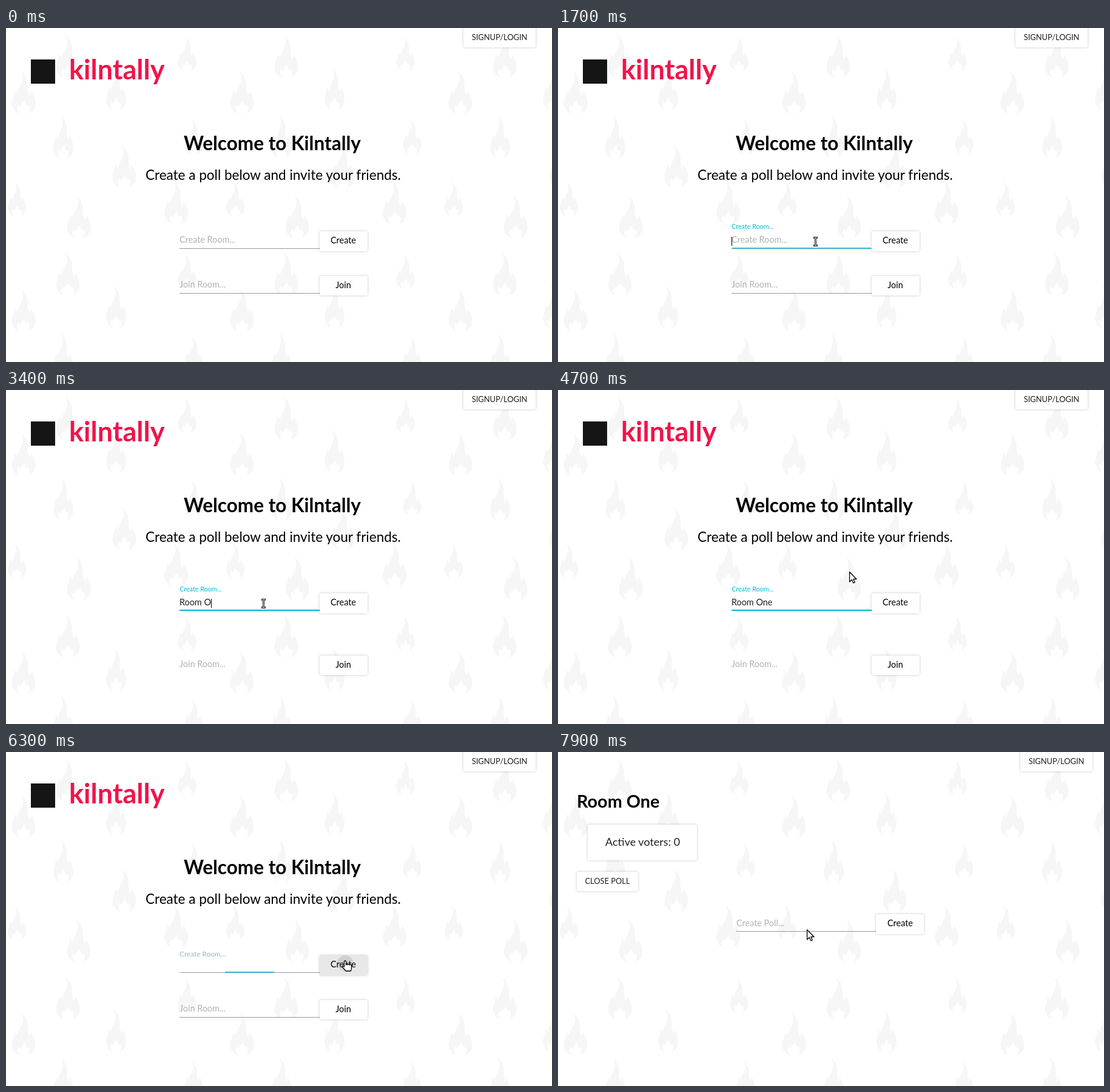
Recreate the animation shown at these times as an HTML page. Size 900x552 px, loop 8000 ms.

```html
<!DOCTYPE html>
<html lang="en">
<head>
<meta charset="utf-8">
<title>Kilntally</title>
<style>
html, body { margin: 0; width: 100%; height: 100%; overflow: hidden; background: #fff; }
svg { display: block; width: 900px; height: 552px; font-family: Lato, sans-serif; }

/* type */
.brand { font-size: 45px; font-weight: 700; fill: #f0144a; }
.h1 { font-size: 31.5px; font-weight: 700; }
.h2 { font-size: 22.5px; }
.room-name { font-size: 28.8px; font-weight: 700; }
.voters { font-size: 18px; fill: #212121; }
.caps { font-size: 12.9px; fill: #212121; text-anchor: middle; }
.btn { font-size: 14.4px; text-anchor: middle; }
.field { font-size: 14.4px; }
.hint { fill: rgba(0, 0, 0, .3); }
.value { fill: #212121; }
.label { font-size: 10.8px; fill: #00bcd4; }

/* surfaces */
.paper { fill: #fff; filter: drop-shadow(0 .9px 2.7px rgba(0, 0, 0, .12)) drop-shadow(0 .9px 1.8px rgba(0, 0, 0, .12)); }
.rule { fill: #999; }
.focus { fill: #00b4cc; }
.focus, .ripple { transform-box: fill-box; transform-origin: center; }
.cursor path { stroke-linejoin: round; }

/* 8 s loop, 1.25% = 100 ms */
.home, .room, .signup, .hint1, .label, .focus, .join, .join-rule, .typing, .mask, .caret,
.hover, .ripple, .cursor, .arrow, .beam, .hand { animation: 8s step-end infinite; }

.home { animation-name: home; }
@keyframes home { 0% { opacity: 1 } 80%, 100% { opacity: 0 } }
.room { animation-name: room; }
@keyframes room { 0% { opacity: 0 } 80%, 100% { opacity: 1 } }
.signup { animation-name: signup; }
@keyframes signup { 0% { transform: none } 80%, 100% { transform: translateX(8px) } }

.hint1 { animation-name: hint; }
@keyframes hint { 0% { opacity: 1 } 28.75%, 100% { opacity: 0 } }
.label { transform-origin: 286px 333px; animation-name: label; }
@keyframes label {
  0% { opacity: 0; transform: translateY(-.6px) }
  21.25% { opacity: 1; transform: translateY(-.6px) }
  22.5% { opacity: 1; transform: none; fill: #00bcd4 }
  78.75%, 100% { opacity: 1; transform: translateY(4.6px) scale(1.1); fill: #8bbccb }
}
.focus { animation-name: focus; }
@keyframes focus {
  0% { transform: scaleX(0) }
  21.25% { transform: scaleX(.99); fill: #35b2c8 }
  22.5% { transform: none; fill: #00b4cc }
  78.75%, 100% { transform: scaleX(.35); fill: #35b2c8 }
}
.join { animation-name: join; }
@keyframes join { 0%, 78.75%, 100% { transform: none } 28.75% { transform: translateY(29px) } }
.join-rule { animation-name: join-rule; }
@keyframes join-rule { 0%, 78.75%, 100% { opacity: 1 } 28.75% { opacity: 0 } }

/* --w is the width of the text typed so far */
.typing, .mask { --w: 0px; animation-name: typing; }
@keyframes typing {
  0% { --w: 0px }
  28.75% { --w: 9px }
  31.25% { --w: 17.3px }
  33.75% { --w: 25.5px }
  37.5% { --w: 37.5px }
  40% { --w: 40.5px }
  42.5% { --w: 52px }
  45% { --w: 60px }
  46.25% { --w: 67.5px }
  78.75%, 100% { --w: 0px }
}
.mask { width: calc(var(--w) + .4px); }
.typed { clip-path: url(#typed); }
.caret-at { transform: translateX(var(--w)); }
.caret { animation-name: caret; }
@keyframes caret {
  0%, 26.25%, 53.75%, 68.75%, 78.75%, 100% { opacity: 0 }
  21.25%, 28.75%, 61.25%, 76.25% { opacity: 1 }
}

.hover { animation-name: hover; }
@keyframes hover { 0%, 80%, 100% { opacity: 0 } 76.25% { opacity: .05 } 77.5% { opacity: .09 } }
.ripple { animation-name: ripple; }
@keyframes ripple {
  0%, 80%, 100% { opacity: 0; transform: scale(.5) }
  77.5% { opacity: .1; transform: scale(.5) }
  78.75% { opacity: .1; transform: none }
}

.cursor { animation-name: move; }
@keyframes move {
  0% { opacity: 0; transform: translate(473.5px, 432px) }
  6.25% { opacity: 1; transform: translate(473.5px, 432px) }
  7.5% { transform: translate(445px, 384px) }
  16.25% { transform: translate(424.5px, 353px) }
  56.25% { transform: translate(439.5px, 340px) }
  57.5% { transform: translate(459px, 314px) }
  58.75% { transform: translate(480px, 300px) }
  60% { transform: translate(498px, 296px) }
  61.25% { transform: translate(515px, 301px) }
  62.5% { transform: translate(530px, 312px) }
  63.75% { transform: translate(543px, 326px) }
  65% { transform: translate(552px, 337px) }
  66.25% { transform: translate(556px, 341px) }
  67.5% { transform: translate(558px, 343px) }
  68.75% { transform: translate(559px, 344px) }
  70% { transform: translate(559px, 345px) }
  80% { transform: translate(558px, 347px) }
  90% { transform: translate(539px, 346px) }
  91.25% { transform: translate(513px, 338px) }
  92.5% { transform: translate(485px, 329px) }
  93.75% { transform: translate(459px, 319px) }
  95% { transform: translate(438px, 309px) }
  96.25% { transform: translate(423px, 301px) }
  97.5% { transform: translate(414px, 296px) }
  98.75%, 100% { opacity: 1; transform: translate(410px, 293px) }
}
.arrow { animation-name: arrow; }
@keyframes arrow { 0%, 16.25%, 65% { opacity: 0 } 7.5%, 57.5%, 80%, 100% { opacity: 1 } }
.beam { animation-name: beam; }
@keyframes beam { 0%, 16.25% { opacity: 1 } 7.5%, 57.5%, 100% { opacity: 0 } }
.hand { animation-name: hand; }
@keyframes hand { 0%, 80%, 100% { opacity: 0 } 65% { opacity: 1 } }
</style>
</head>
<body>
<svg viewBox="0 0 900 552" xmlns="http://www.w3.org/2000/svg">
  <defs>
    <path id="flame" d="M-5 0C5 7 8 18 7 28C7 34 8 37 10 40C12 38 12 36 12 33C17 40 20 47 19.5 55C19 63 14 69 7 71C11 66 11 61 8 57C6 60 3 58 2 50C-3 53-4 56-5 60C-7 59-8 58-8 56C-12 61-11 67-6 71C-14 69-19.5 62-19.5 54C-19.5 46-15 41-15 33C-13 34-12 36-11 38C-8 28-1 21-1 12C-1 7-3 3-5 0Z"/>
    <pattern id="fire" width="360" height="360" patternUnits="userSpaceOnUse">
      <g fill="#f6f6f6">
        <use href="#flame" transform="translate(102 11)"/>
        <use href="#flame" transform="translate(29 70.5)"/>
        <use href="#flame" transform="translate(195 193)"/>
        <use href="#flame" transform="translate(280.5 253)"/>
        <use href="#flame" transform="translate(120 276)"/>
        <use href="#flame" transform="translate(181.5 65) scale(.84 1)"/>
        <use href="#flame" transform="translate(94.5 144.5) scale(.84 1)"/>
        <use href="#flame" transform="translate(298.5 14) scale(.78 .8)"/>
        <use href="#flame" transform="translate(309.5 151) scale(.78 .8)"/>
        <use href="#flame" transform="translate(18 254) scale(.78 .8)"/>
      </g>
    </pattern>
    <clipPath id="typed"><rect class="mask" x="286" y="340" height="24"/></clipPath>
  </defs>

  <rect width="900" height="552" fill="url(#fire)"/>

  <g class="signup">
    <rect class="paper" x="754" y="-4" width="119" height="36" rx="2"/>
    <text class="caps" x="813.5" y="20">SIGNUP/LOGIN</text>
  </g>

  <g class="home">
    <rect x="41" y="52" width="40" height="40" fill="#151515"/>
    <text class="brand" x="104" y="85">kilntally</text>
    <text class="h1" x="293" y="201.5">Welcome to Kilntally</text>
    <text class="h2" x="230" y="251">Create a poll below and invite your friends.</text>

    <rect class="rule" x="286" y="364" width="231" height="1"/>
    <rect class="focus" x="286" y="363" width="231" height="2"/>
    <text class="label" x="286" y="333">Create Room...</text>
    <text class="field hint hint1" x="286" y="355">Create Room...</text>
    <g class="typing">
      <g class="typed"><text class="field value" x="286" y="356">Room One</text></g>
      <g class="caret-at"><rect class="caret" x="286" y="345" width="1" height="15"/></g>
    </g>
    <rect class="paper" x="517" y="336" width="79" height="33" rx="2"/>
    <rect class="hover" x="517" y="336" width="79" height="33" rx="2"/>
    <circle class="ripple" cx="559" cy="349" r="13"/>
    <text class="btn" x="556" y="356">Create</text>

    <g class="join">
      <rect class="rule join-rule" x="286" y="438" width="231" height="1"/>
      <text class="field hint" x="286" y="429">Join Room...</text>
      <rect class="paper" x="517" y="410" width="79" height="32" rx="2"/>
      <text class="btn" x="556" y="430">Join</text>
    </g>
  </g>

  <g class="room">
    <text class="room-name" x="31" y="92">Room One</text>
    <rect class="paper" x="49" y="120" width="180" height="59" rx="2"/>
    <text class="voters" x="78" y="155">Active voters: 0</text>
    <rect class="paper" x="31" y="198" width="101" height="32" rx="2"/>
    <text class="caps" x="81.5" y="218">CLOSE POLL</text>
    <rect class="rule" x="294" y="296" width="230" height="1"/>
    <text class="field hint" x="294" y="288">Create Poll...</text>
    <rect class="paper" x="524" y="268" width="79" height="33" rx="2"/>
    <text class="btn" x="564" y="288">Create</text>
  </g>

  <g class="cursor">
    <path class="arrow" d="M.6.8V17L4.3 13.5 6.8 19 9.3 17.9 6.9 12.5H12Z" fill="#fff" stroke="#000" stroke-width="1.3"/>
    <g class="beam" fill="none">
      <path d="M-3.5-6.5H3.5M0-6.5V6.5M-3.5 6.5H3.5" stroke="#000" stroke-width="3"/>
      <path d="M-2.5-6.5H2.5M0-6.5V6.5M-2.5 6.5H2.5" stroke="#fff"/>
    </g>
    <path class="hand" d="M-1.5 10V1.5a1.5 1.5 0 0 1 3 0V7q0-1.5 1.5-1.5T4.5 7q0-1.3 1.5-1.3T7.5 7.2q0-1 1.5-1T10.5 8v5q0 2-1.5 4H1.2L-4.5 10.5q-.5-2 1.2-2Z" fill="#fff" stroke="#000" stroke-width="1.3"/>
  </g>
</svg>
</body>
</html>
```
